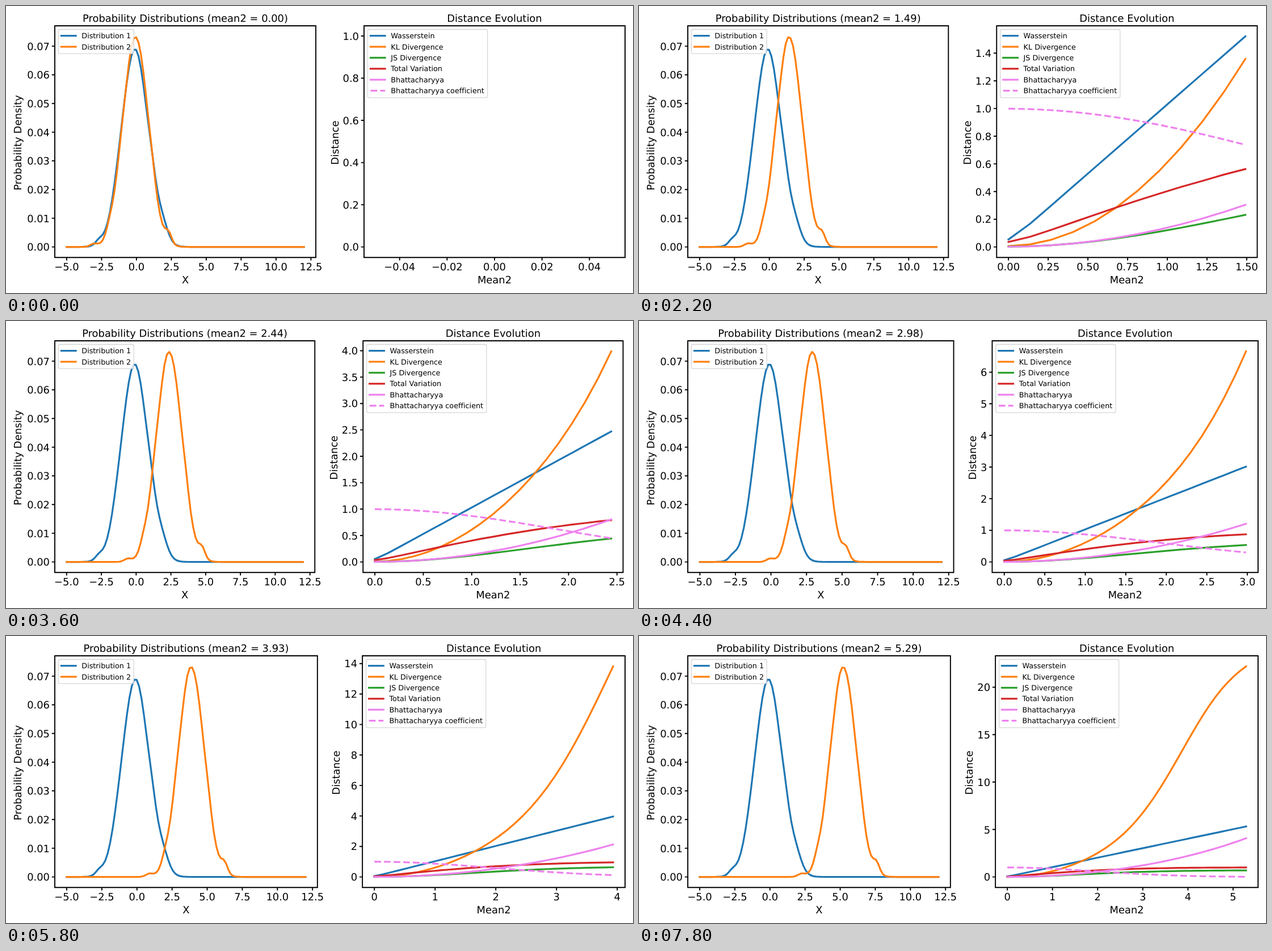
Write an HTML page that moves like this. It is 1105 px wide and 507 px high and loops after 8 s.

```html
<!DOCTYPE html>
<html lang="en">
<head>
<meta charset="utf-8">
<title>Probability distances</title>
<style>
html, body { margin: 0; width: 100%; height: 100%; overflow: hidden; background: #fff; }
svg { display: block; }
text {
  font-family: "DejaVu Sans", Verdana, sans-serif;
  font-size: 17.9px;
  font-variant-ligatures: none;
  text-rendering: geometricPrecision;
}
.small { font-size: 12.79px; }
.mid { text-anchor: middle; }
.end { text-anchor: end; }
.axis { fill: none; stroke: #000; stroke-width: 1.9; }
.curve { fill: none; stroke-width: 3.2; stroke-linejoin: round; stroke-linecap: square; }
.dash { stroke-linecap: butt; stroke-dasharray: 11.83 5.12; }
.box { fill: #fff; fill-opacity: .8; stroke: #ccc; stroke-opacity: .8; stroke-width: 1.28; }
</style>
</head>
<body>
<svg id="stage" width="1105" height="507" viewBox="0 0 1105 507"></svg>
<script>
const STEP_MS = 200, STEPS = 40, MEAN_STEP = 8 / 59;
const TOP = 35, BOTTOM = 444.2, LEFT = 86, RIGHT = 1091, FONT = 17.9;
const BLUE = '#1f77b4', ORANGE = '#ff7f0e', GREEN = '#2ca02c', RED = '#d62728', VIOLET = '#ee82ee';
const stage = document.getElementById('stage');

const range = (n, f) => Array.from({ length: n }, (_, i) => f(i));
const sum = (list, f) => list.reduce((total, v) => total + f(v), 0);
const bell = (x, height, centre, spread) => height * Math.exp(-(((x - centre) / spread) ** 2) / 2);

// Each density is one wide bell with a few small bumps: height, centre, spread
const mixture = bells => x => sum(bells, b => bell(x, ...b));
const density1 = mixture([[.069, -.11, .95], [.004, 1.85, .4], [.0024, 1.1, .25],
  [.0013, -2.7, .25], [.0012, -1.4, .35]]);
const density2 = mixture([[.0725, -.03, .89], [.0045, -1.15, .35], [.0028, -1.9, .25],
  [.0034, 2.3, .22], [.0018, 1.15, .2], [.001, -3.05, .25], [.0018, -.4, .25]]);
const gridX = range(100, i => -5 + 17 * i / 99);

const overGrid = term => mean => sum(gridX, x => term(density1(x), density2(x - mean)));
const entropyTerm = (a, b) => a * Math.log((a + 1e-12) / ((a + b) / 2 + 1e-12)) / 2;
const variation = overGrid((p, q) => Math.abs(p - q) / 2);
const jensen = overGrid((p, q) => entropyTerm(p, q) + entropyTerm(q, p));

// These depend on the far tails, so they follow fitted growth laws
const wasserstein = m => m + .03 + .024 * Math.exp(-20 * m);
const kl = m => .006 + .01 * m + m * m * (.59 + bell(m, .316, 4.27, 1.075));
const bhatt = m => .0015 + m * m * (.135 + .0013 * (m - 2.4) ** 2);

const DISTRIBUTIONS = [['Distribution 1', BLUE], ['Distribution 2', ORANGE]];
const DISTANCES = [
  ['Wasserstein', BLUE, wasserstein],
  ['KL Divergence', ORANGE, kl],
  ['JS Divergence', GREEN, jensen],
  ['Total Variation', RED, variation],
  ['Bhattacharyya', VIOLET, bhatt],
  ['Bhattacharyya coefficient', VIOLET, m => Math.exp(-bhatt(m)), 'dash']
];
const history = DISTANCES.map(([, color, f, cls]) =>
  [range(STEPS, i => [i * MEAN_STEP, f(i * MEAN_STEP)]), color, cls]);

const padded = (lo, hi) => [lo - .05 * (hi - lo), hi + .05 * (hi - lo)];

function ticks([lo, hi], bins) {
  const raw = (hi - lo) / bins, exp = Math.floor(Math.log10(raw)), unit = 10 ** exp;
  const mult = [1, 2, 2.5, 5, 10].find(s => s * unit >= raw);
  const step = mult * unit;
  const digits = Math.max(0, -exp + (mult === 2.5) - (mult === 10));
  const first = Math.ceil(lo / step), last = Math.floor(hi / step);
  return range(last - first + 1, i => {
    const value = (first + i) * step;
    return { value, label: value.toFixed(digits).replace('-', '\u2212') };
  });
}

const labelWidth = s => sum([...s], c => c === '.' ? .318 : c === '\u2212' ? .838 : .636) * FONT;
const text = (x, y, s, cls, extra = '') => `<text x="${x}" y="${y}" class="${cls}" ${extra}>${s}</text>`;
const curve = (points, color, cls = '') =>
  `<path class="curve ${cls}" stroke="${color}" d="M${points.map(p => p[0].toFixed(2) + ' ' + p[1].toFixed(2)).join('L')}"/>`;

function legend(x, entries, textWidth) {
  const rows = entries.map(([name, color, , cls], i) => {
    const y = 52.6 + 19.4 * i;
    return curve([[x + 11.5, y], [x + 37.1, y]], color, cls) + text(x + 47.3, y + 4.5, name, 'small');
  });
  return `<rect class="box" x="${x + 6.4}" y="41.5" rx="2.6" width="${textWidth + 46}" height="${entries.length * 19.4 + 3.9}"/>` + rows.join('');
}

function panel(p) {
  const { x, width, xlim, ylim, xticks, yticks } = p;
  const px = v => x + (v - xlim[0]) / (xlim[1] - xlim[0]) * width;
  const py = v => BOTTOM - (v - ylim[0]) / (ylim[1] - ylim[0]) * (BOTTOM - TOP);
  const mid = x + width / 2;
  let marks = '', labels = '';
  for (const t of xticks) {
    marks += `M${px(t.value)} ${BOTTOM}v5.2`;
    labels += text(px(t.value), 466.5, t.label, 'mid');
  }
  for (const t of yticks) {
    marks += `M${x} ${py(t.value)}h-5.2`;
    labels += text(x - 9, py(t.value) + 6.7, t.label, 'end');
  }
  const lines = p.lines.map(([points, color, cls]) =>
    curve(points.map(([a, b]) => [px(a), py(b)]), color, cls)).join('');
  return `<clipPath id="${p.id}"><rect x="${x}" y="${TOP}" width="${width}" height="${BOTTOM - TOP}"/></clipPath>
    <g clip-path="url(#${p.id})">${lines}</g>
    <path class="axis" d="${marks}M${x} ${TOP}h${width}V${BOTTOM}h${-width}Z"/>
    ${labels}
    ${text(mid, 27.7, p.title, 'mid')}
    ${text(mid, 490, p.xlabel, 'mid')}
    ${text(0, 0, p.ylabel, 'mid', `transform="translate(${p.ylabelX} 241.5) rotate(-90)"`)}
    ${legend(x, p.entries, p.legendWidth)}`;
}

function draw(k) {
  const mean = k * MEAN_STEP;
  const curves = history.map(([points, color, cls]) => [points.slice(0, k + 1), color, cls]);
  const peak = Math.max(...curves.flatMap(c => c[0].map(q => q[1])));
  const xlim = k ? padded(0, mean) : [-.055, .055];
  const ylim = padded(0, peak);
  const xticks = ticks(xlim, 8), yticks = ticks(ylim, 9);

  // Tight layout: both panels shrink to fit the tick labels
  const tickWidth = Math.max(...yticks.map(t => labelWidth(t.label)));
  const lastTick = xticks[xticks.length - 1];
  const inset = (xlim[1] - lastTick.value) / (xlim[1] - xlim[0]) * 459;
  const right = RIGHT - Math.max(0, labelWidth(lastTick.label) / 2 - inset);
  const width = (right - LEFT - 56.5 - tickWidth) / 2;
  const x = right - width;

  const shapes = [
    [gridX.map(v => [v, density1(v)]), BLUE],
    [gridX.map(v => [v, density2(v - mean)]), ORANGE]
  ];
  const leftX = padded(-5, 12), leftY = padded(0, .0734);

  stage.innerHTML = panel({
    id: 'left', x: LEFT, width, xlim: leftX, ylim: leftY,
    xticks: ticks(leftX, 8), yticks: ticks(leftY, 9), lines: shapes,
    title: `Probability Distributions (mean2 = ${mean.toFixed(2)})`,
    xlabel: 'X', ylabel: 'Probability Density', ylabelX: 27.4,
    entries: DISTRIBUTIONS, legendWidth: 86.8
  }) + panel({
    id: 'right', x, width, xlim, ylim, xticks, yticks, lines: k ? curves : [],
    title: 'Distance Evolution',
    xlabel: 'Mean2', ylabel: 'Distance', ylabelX: x - 9 - tickWidth - 8,
    entries: DISTANCES, legendWidth: 165.2
  });
}

let shown = -1;
function tick() {
  const k = Math.floor(performance.now() / STEP_MS) % STEPS;
  if (k !== shown) draw(shown = k);
  requestAnimationFrame(tick);
}
tick();
</script>
</body>
</html>
```
